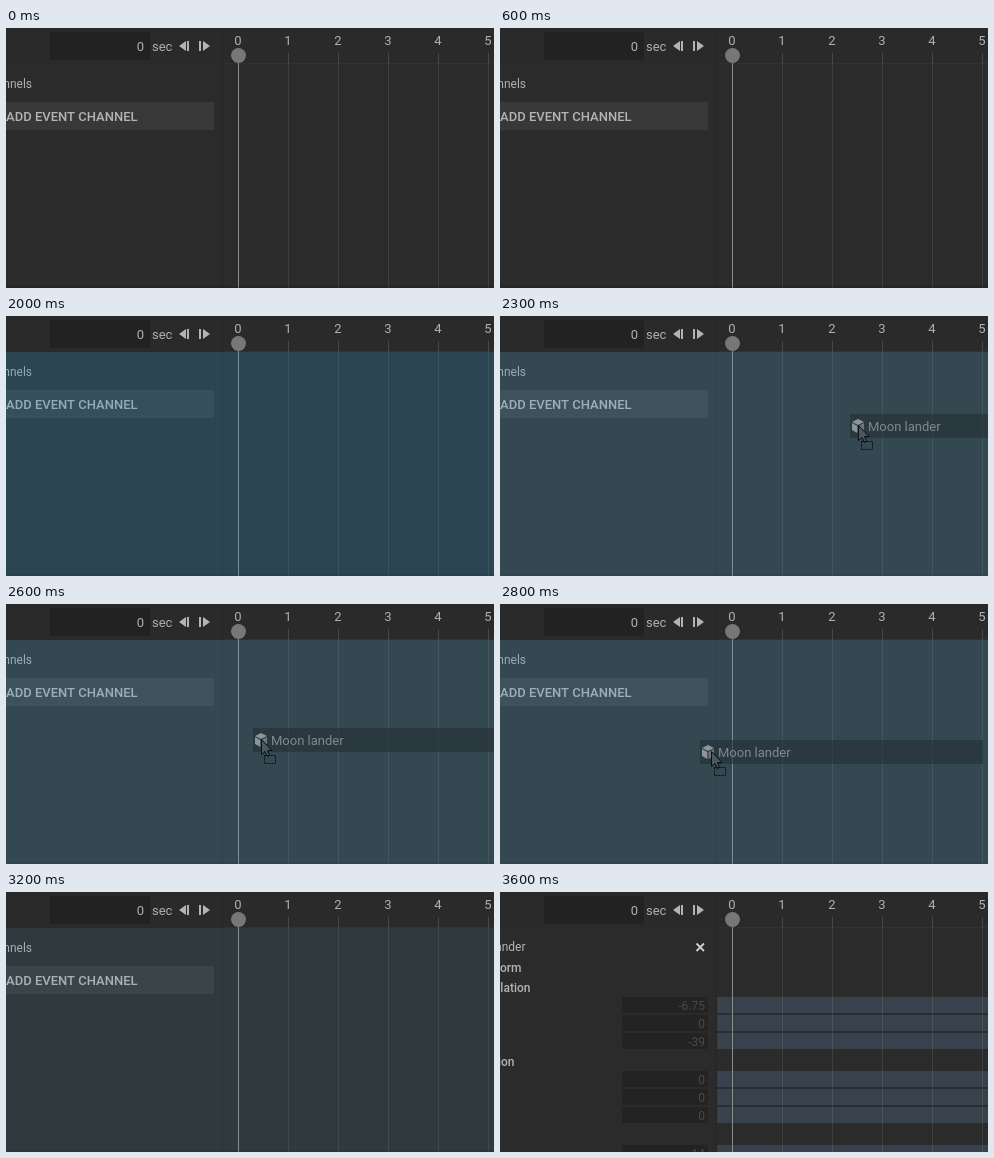
An HTML page with a canvas that plays this animation: 488 px wide and 260 px high, repeating every 4 s.

```html
<!DOCTYPE html>
<html lang="en">
<head>
<meta charset="utf-8">
<title>Timeline drag and drop</title>
<style>
html, body { margin: 0; width: 100%; height: 100%; overflow: hidden; background: #2b2b2b; }
canvas { display: block; }
</style>
</head>
<body>
<canvas id="stage" width="488" height="260"></canvas>
<script>
const W = 488, H = 260, LOOP = 4000, STEP = 100;
const HEADER = 36, SPLIT = 217, ORIGIN = 232, SECOND = 50;
const ctx = document.getElementById('stage').getContext('2d');

// Ghost positions while dragging, one per step
const DRAG_START = 2100, DROP = 3200;
const path = [
  [430, 60], [395, 80], [350, 98], [310, 108], [275, 114],
  [247, 124], [222, 130], [200, 136], [182, 139], [173, 137]
];

function rect(x, y, w, h, color) {
  ctx.fillStyle = color;
  ctx.fillRect(x, y, w, h);
}

function text(str, x, y, color, { size = 13, weight = 400, align = 'left' } = {}) {
  ctx.font = `${weight} ${size}px Roboto, sans-serif`;
  ctx.textAlign = align;
  ctx.fillStyle = color;
  ctx.fillText(str, x, y);
}

function poly(points, fill, stroke) {
  ctx.beginPath();
  for (const [x, y] of points) ctx.lineTo(x, y);
  ctx.closePath();
  if (fill) {
    ctx.fillStyle = fill;
    ctx.fill();
  }
  if (stroke) {
    ctx.strokeStyle = stroke;
    ctx.lineWidth = 1;
    ctx.stroke();
  }
}

function drawHeader() {
  rect(0, 0, W, HEADER, '#2a2a2a');
  rect(44, 4, 100, 28, '#222');
  text('0', 138, 23, '#b0b0b0', { align: 'right' });
  text('sec', 146, 23, '#b0b0b0');
  const icon = '#b4b4b4';
  poly([[180, 13], [180, 23], [173, 18]], icon);
  rect(181, 13, 2, 10, icon);
  rect(193, 13, 2, 10, icon);
  poly([[197, 13], [197, 23], [204, 18]], icon);
  rect(SPLIT, HEADER - 1, W - SPLIT, 1, '#323232');
  for (let i = 0; i <= 5; i++) {
    text(i, ORIGIN + i * SECOND, 17, '#b0b0b0', { align: 'center' });
  }
}

function drawGrid() {
  for (let i = 1; i <= 5; i++) {
    const x = ORIGIN + i * SECOND;
    rect(x, 25, 1, H - 25, 'rgba(255,255,255,0.09)');
    rect(x, 25, 1, 10, '#484848');
  }
  rect(ORIGIN, 34, 1, H - 34, '#8c8c8c');
  ctx.fillStyle = '#777';
  ctx.beginPath();
  ctx.arc(ORIGIN + 0.5, 27.5, 7.5, 0, Math.PI * 2);
  ctx.fill();
}

function drawEmptyPanel() {
  text('Channels', 26, 60, '#b0b0b0', { size: 12, align: 'right' });
  rect(0, 74, 208, 28, '#383838');
  text('ADD EVENT CHANNEL', 0, 93, '#b4b4b4', { weight: 500 });
}

function drawChannels() {
  const label = (str, right, y, weight = 500) =>
    text(str, right, y, '#b4b4b4', { size: 12, weight, align: 'right' });
  label('Moon lander', 25.5, 59, 400);
  label('Transform', 21.5, 80);
  label('Translation', 30.5, 100);
  label('Rotation', 14.5, 174);

  ctx.strokeStyle = '#d0d0d0';
  ctx.lineWidth = 1.8;
  ctx.beginPath();
  ctx.moveTo(196.5, 51.5);
  ctx.lineTo(204, 59);
  ctx.moveTo(204, 51.5);
  ctx.lineTo(196.5, 59);
  ctx.stroke();

  const group = (top, values) => {
    rect(SPLIT, top, W - SPLIT, values.length * 18 - 2, '#282d30');
    values.forEach((value, i) => {
      const y = top + i * 18;
      rect(122, y, 86, 16, '#232323');
      text(value, 205, y + 13, '#4a4a4a', { size: 12, align: 'right' });
      rect(SPLIT, y, W - SPLIT, 16, '#37424c');
    });
  };
  group(105, ['-6.75', '0', '-39']);
  group(179, ['0', '0', '0']);
  group(253, ['14']);
}

function drawCube(cx, cy) {
  poly([[cx, cy - 7], [cx + 6, cy - 4], [cx, cy - 1], [cx - 6, cy - 4]], '#8b959a');
  poly([[cx - 6, cy - 3], [cx - 0.6, cy], [cx - 0.6, cy + 7], [cx - 6, cy + 4]], '#8b959a');
  poly([[cx + 6, cy - 3], [cx + 0.6, cy], [cx + 0.6, cy + 7], [cx + 6, cy + 4]], '#6d787e');
}

function drawCursor(x, y) {
  const arrow = [[0, 0], [0, 15], [3.5, 12], [6, 17], [8, 16], [6, 11], [10.5, 11]];
  poly(arrow.map(([dx, dy]) => [x + dx + 0.5, y + dy + 0.5]), '#4b585f', '#0c0f11');
  ctx.strokeStyle = '#0c0f11';
  ctx.lineWidth = 1;
  ctx.setLineDash([2, 1]);
  ctx.strokeRect(x + 3.5, y + 16.5, 11, 8);
  ctx.setLineDash([]);
}

function drawGhost(index) {
  const [x, y] = path[index];
  rect(x, y, 283, 24, 'rgba(35,45,51,0.6)');
  drawCube(x + 8, y + 12);
  text('Moon lander', x + 18, y + 17, '#7f8a90');
  const lag = Math.max(0, index - 5) * 1.25;
  drawCursor(Math.round(x + 8 + lag), y + 11);
}

function drawOverlay(t) {
  if (t < 1400 || t >= DROP + STEP) return;
  const alpha = t >= DROP ? 0.12 : 0.25;
  const tint = t < DRAG_START ? '51,147,203' : '79,159,199';
  rect(0, HEADER, W, H - HEADER, `rgba(${tint},${alpha})`);
}

function draw(t) {
  const dropped = t >= DROP + STEP;
  rect(0, 0, W, H, '#2b2b2b');
  drawHeader();
  if (dropped) drawChannels();
  else drawEmptyPanel();
  rect(SPLIT - 1, 0, 1, H, '#242424');
  drawGrid();
  if (!dropped) rect(0, H - 2, W, 2, 'rgba(0,0,0,0.15)');
  drawOverlay(t);
  if (t >= DRAG_START && t < DROP) {
    drawGhost(Math.min(path.length - 1, Math.floor((t - DRAG_START) / STEP)));
  }
}

const start = performance.now();
function tick() {
  draw((performance.now() - start) % LOOP);
  requestAnimationFrame(tick);
}
tick();
</script>
</body>
</html>
```
